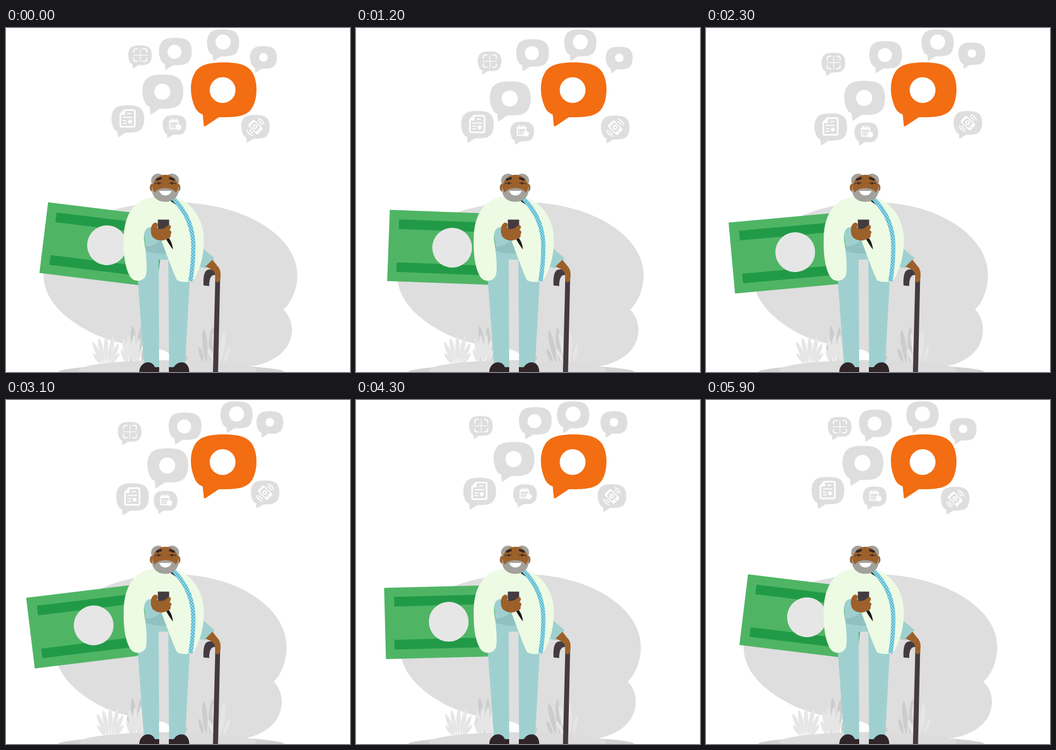
These frames come from a looping animation (640 px wide and 640 px high, 6000 ms). An HTML page:

```html
<!DOCTYPE html>
<html lang="en">
<head>
<meta charset="utf-8">
<title>Mobile wallet</title>
<style>
  html, body { margin: 0; width: 100%; height: 100%; overflow: hidden; background: #fff; }
  svg { display: block; width: 100%; height: 100%; }
  .line { fill: none; stroke: #fff; stroke-width: 2; }
  .thin { stroke-width: 1.2; }
  .thick { stroke-width: 3; }
  .white { fill: #fff; }
  .grey { fill: #dedede; }
  .skin { fill: #9c612b; }
  .hair { fill: #a3a19c; }
  .teal { fill: #9fd0cf; }
  .robe { fill: #eefbe4; }
  .dark { fill: #433b40; }
  .shoe { fill: #2f2529; }
  .black { fill: #171819; }
</style>
</head>
<body>
<svg viewBox="0 0 640 640" xmlns="http://www.w3.org/2000/svg">
  <defs>
    <path id="bubble" d="M61 0C92 0 106 6 114 18C120 28 122 39 122 50C122 64 119 77 113 86C104 99 88 102 61 102H52L28 118C26 119.500 24 119 24 117L22 97C12 93 8 86 5 77C2 68 0 60 0 50C0 38 2 28 8 18C16 6 30 0 61 0Z"/>
    <pattern id="weave" width="5" height="6" patternUnits="userSpaceOnUse">
      <rect width="5" height="6" fill="#52b7d0"/>
      <path d="M0 0L5 6M5 0L0 6" stroke="#c4ebf2" stroke-width=".9"/>
    </pattern>
  </defs>

  <path id="blob" class="grey" d="M70 460C70 380 180 324 310 324C440 324 542 385 542 460C542 485 532 510 516 524C526 533 532 546 532 562C532 595 505 620 460 629L330 632C318 618 300 598 285 598C240 592 190 585 150 562C100 535 70 500 70 460Z"/>

  <g id="grass"></g>
  <ellipse cx="307.500" cy="640" rx="210" ry="14" fill="#d2d2d2"/>
  <ellipse cx="301" cy="637" rx="165" ry="19" fill="#dcdcdc"/>

  <g id="note">
    <rect x="56.500" y="345" width="220" height="132.400" fill="#4fb565"/>
    <rect x="74.500" y="362" width="184" height="18" fill="#219a47"/>
    <rect x="73" y="442" width="184" height="18" fill="#219a47"/>
    <circle cx="175" cy="411" r="37" fill="#e6e6e6"/>
  </g>

  <g id="man">
    <path class="teal" d="M364 408L388 428L371 447L358 444Z"/>
    <path class="dark" d="M389.500 462H398.500L394.500 640H385Z"/>
    <path class="dark" d="M367.500 479C367 462 368 449 380 449C387 449 390 454 391 460C384 458 378 462 378 480Z"/>
    <path class="skin" d="M371 444L384 431L396 446C400 453 400 460 398 469C396 474 391 474 390 470L388.500 456C385 449 378 447 371 444Z"/>

    <path class="teal" d="M245 465L258 410H303L342 465L333 632H303.500L302 431H284L285 632H257Z"/>
    <path class="shoe" d="M248 640C248 629 256 622 264 622C271 622 275 626 277 631H285V640Z"/>
    <path class="shoe" d="M303 640V631H312C316 625 321 622 327 622C335 622 341 629 341 640Z"/>

    <path class="teal" d="M255 366H292V400L260 412Z"/>
    <path d="M259 406C268 409 279 403 290 393L303 420C288 421 270 418 260 415Z" fill="#90c1c0"/>
    <path class="robe" d="M276 314C236 317 219 352 219 393C218 425 223 452 233 465C240 473 255 472 260 461C264 448 260 415 257 395C255 377 262 368 272 371L289 395C297 415 307 445 318 469C325 474 345 474 350 467C360 450 369 425 368 390C367 355 345 325 318 316Z"/>
    <path class="black" d="M303 320L312 319L324 334C317 329 311 325 303 320Z"/>
    <path class="black" d="M297 391H303C307 396 310 404 310.500 412C306 406 301 399 297 391Z"/>
    <path d="M311 317C335 341 348 370 348.500 405C348.500 430 346 455 343 471" fill="none" stroke="url(#weave)" stroke-width="8"/>

    <rect class="dark" x="282.500" y="356.500" width="21" height="20"/>
    <path class="skin" d="M277 362C282 362 284 366 281 371C283 375 288 374 294 373C298 371 301 366 305 367C308 369 307 373 304 376C308 377 309 381 306 384C308 389 303 392 298 393C292 397 280 396 274 390C268 384 267 366 277 362Z"/>

    <circle class="hair" cx="283" cy="284" r="13"/>
    <circle class="hair" cx="309" cy="284" r="13"/>
    <ellipse class="skin" cx="271.500" cy="297" rx="4" ry="7"/>
    <ellipse class="skin" cx="320.500" cy="297" rx="4" ry="7"/>
    <circle class="skin" cx="296.500" cy="297" r="24"/>
    <path class="hair" d="M272 293C273 301 275 304 277 306C281 300 289 298 296.500 298C304 298 312 300 316 306C319 303 320 299 321 293C324 312 313 323.500 296.500 323.500C280 323.500 269 312 272 293Z"/>
    <path class="white" d="M285 303H308C306 309 302 311.500 296.500 311.500C291 311.500 287 309 285 303Z"/>
    <g fill="none" stroke="#2f2529" stroke-linecap="round">
      <path d="M281 282L288 279.500M312 282L305 279.500" stroke-width="4"/>
      <path d="M277 290C281 287 285 287 289 289M316 290C312 287 308 287 304 289" stroke-width="1.300"/>
    </g>
    <circle class="shoe" cx="284" cy="289.500" r="1.700"/>
    <circle class="shoe" cx="309" cy="289.500" r="1.700"/>
  </g>

  <g id="scan">
    <path class="line" d="M10.500 14V10Q10.500 6.500 14 6.500H18M27 6.500H31Q34.500 6.500 34.500 10V14M34.500 23V27Q34.500 29.500 31 29.500H27M18 29.500H14Q10.500 29.500 10.500 27V23"/>
    <path class="line thin" d="M9.500 18.300H35.500M22.500 5.500V31"/>
  </g>
  <g id="disc"><circle class="white" cx="29" cy="26" r="13"/></g>
  <g id="pen"><circle class="white" cx="30" cy="23.500" r="14"/></g>
  <g id="show"><circle class="white" cx="25" cy="20.500" r="8"/></g>
  <g id="coin"><circle class="white" cx="37" cy="32" r="15"/></g>
  <g id="doc">
    <path class="line thick" d="M24 9H41Q43.500 9 43.500 11.500V37.500Q43.500 40 41 40H19Q16.500 40 16.500 37.500V17Z"/>
    <path class="white" d="M25 8V18H16Z"/>
    <path class="line" d="M29 15.500H37M21 22.500H39M21 28.500H28M21 33.500H28"/>
    <circle class="white" cx="34.500" cy="30.500" r="3.600"/>
  </g>
  <g id="date">
    <path class="line" d="M13 10.500H28.500V25.500H13ZM13 12.500H28.500M16.500 6.500V11M21 6.500V11M25.500 6.500V11"/>
    <path class="line" stroke-dasharray="2.400 1.800" d="M15.500 18H26M15.500 22H26"/>
    <circle class="white" cx="29.500" cy="22.500" r="5.200"/>
  </g>
  <g id="call">
    <g transform="translate(26.500 22.500) rotate(-45)">
      <rect class="white" x="-8" y="-12.500" width="16" height="25" rx="2.500"/>
      <rect class="grey" x="-6" y="-8.500" width="12" height="15.500"/>
      <circle class="white" r="4.300" cy="-.8"/>
      <circle class="grey" r="2" cy="-.8"/>
      <circle class="grey" r="1.300" cy="9.800"/>
      <path class="line" d="M11 -5Q14 0 11 5M14.500 -8Q19.500 0 14.500 8M-11 -5Q-14 0 -11 5M-14.500 -8Q-19.500 0 -14.500 8"/>
    </g>
  </g>

  <use href="#bubble" x="344" y="64" fill="#f36d12"/>
  <circle class="white" cx="403" cy="115.500" r="24"/>
</svg>

<script>
const LOOP = 6000;
const RAD = Math.PI / 180;
const LIGHT = '#e6e6e6', SHADE = '#cccccc';
const byId = id => document.getElementById(id);
const place = (el, value) => el.setAttribute('transform', value);

function add(parent, tag, attrs) {
  const el = document.createElementNS('http://www.w3.org/2000/svg', tag);
  for (const k in attrs) el.setAttribute(k, attrs[k]);
  return parent.appendChild(el);
}

let seed = 7;
const random = () => (seed = seed * 16807 % 2147483647) / 2147483647;

// A fan of n blades, tallest in the middle, opening to the given half angle.
function clump(x, y, n, height, fan, fill) {
  const g = add(byId('grass'), 'g', { fill });
  for (let i = 0; i < n; i++) {
    const side = 2 * i / (n - 1) - 1;
    const h = height * (1 - .5 * side * side) * (.85 + .15 * random());
    const w = 3 + h / 22;
    add(g, 'path', {
      d: `M0 0C${-w} ${-h * .4} ${-w} ${-h * .85} 0 ${-h}C${w} ${-h * .85} ${w} ${-h * .4} 0 0Z`,
      transform: `translate(${x + 9 * side} ${y}) rotate(${fan * side})`
    });
  }
  return g;
}

const leftGrass = clump(186, 626, 7, 60, 36, LIGHT);
const backGrass = clump(243, 624, 4, 78, 12, SHADE);
const midGrass = clump(233, 625, 6, 62, 20, LIGHT);
const lowGrass = clump(322, 622, 5, 28, 25, SHADE);
const darkGrass = clump(376, 624, 4, 74, 14, SHADE);
const paleGrass = clump(396, 624, 4, 66, 20, LIGHT);

// Cosine swing: reach in px, lag in degrees, bend adds a second harmonic.
const swing = (reach, lag, bend = 0) => phase =>
  reach * Math.cos(phase - lag * RAD) + bend * Math.cos(2 * phase);

const bubbles = [];
function floating(id, width, x, y, dx, dy) {
  const el = byId(id);
  el.prepend(add(el, 'use', { href: '#bubble', class: 'grey', transform: `scale(${width / 122})` }));
  bubbles.push(phase => place(el, `translate(${x + dx(phase)} ${y + dy(phase)})`));
}

floating('scan', 44, 218, 37, swing(11, 32), swing(9.6, 119));
floating('disc', 61, 297.5, 19, swing(9, 180, -4), swing(5.3, 122, 2));
floating('pen', 60, 384, 2.6, swing(16.7, 142, 3), swing(0, 0));
floating('show', 50, 460.3, 27.8, swing(9.3, 133), swing(8.4, 42));
floating('coin', 76, 255.3, 88.8, swing(5.2, 210, 3), swing(11.8, 101));
floating('doc', 61, 199, 149.7, swing(4.4, 194, 1.5), swing(9, 132));
floating('date', 44, 286.3, 166, swing(9.9, -29, -3.5), swing(10.8, 112));
floating('call', 53, 450.3, 157.8, swing(11, 148, -3.5), swing(6.1, 17, -2));

function draw() {
  const phase = performance.now() % LOOP / LOOP * 2 * Math.PI;
  const drift = (1 - Math.cos(phase)) / 2;
  const sway = (1 - Math.cos(2 * phase)) / 2;

  place(byId('note'), `rotate(${7 * Math.cos(phase)} 237 513)`);
  place(byId('blob'), `translate(306 0) scale(${1 - .085 * drift} 1) translate(-306 0)`);
  place(leftGrass, `translate(${8 * drift} 0)`);
  place(midGrass, `translate(${9 * drift} 0) rotate(${4 * drift} 235 625)`);
  place(backGrass, `rotate(${-5 * sway} 243 624)`);
  place(lowGrass, `rotate(${-2 * sway} 322 622)`);
  for (const g of [darkGrass, paleGrass]) place(g, `rotate(${-9 * sway} 386 624)`);
  for (const move of bubbles) move(phase);

  requestAnimationFrame(draw);
}
draw();
</script>
</body>
</html>
```
